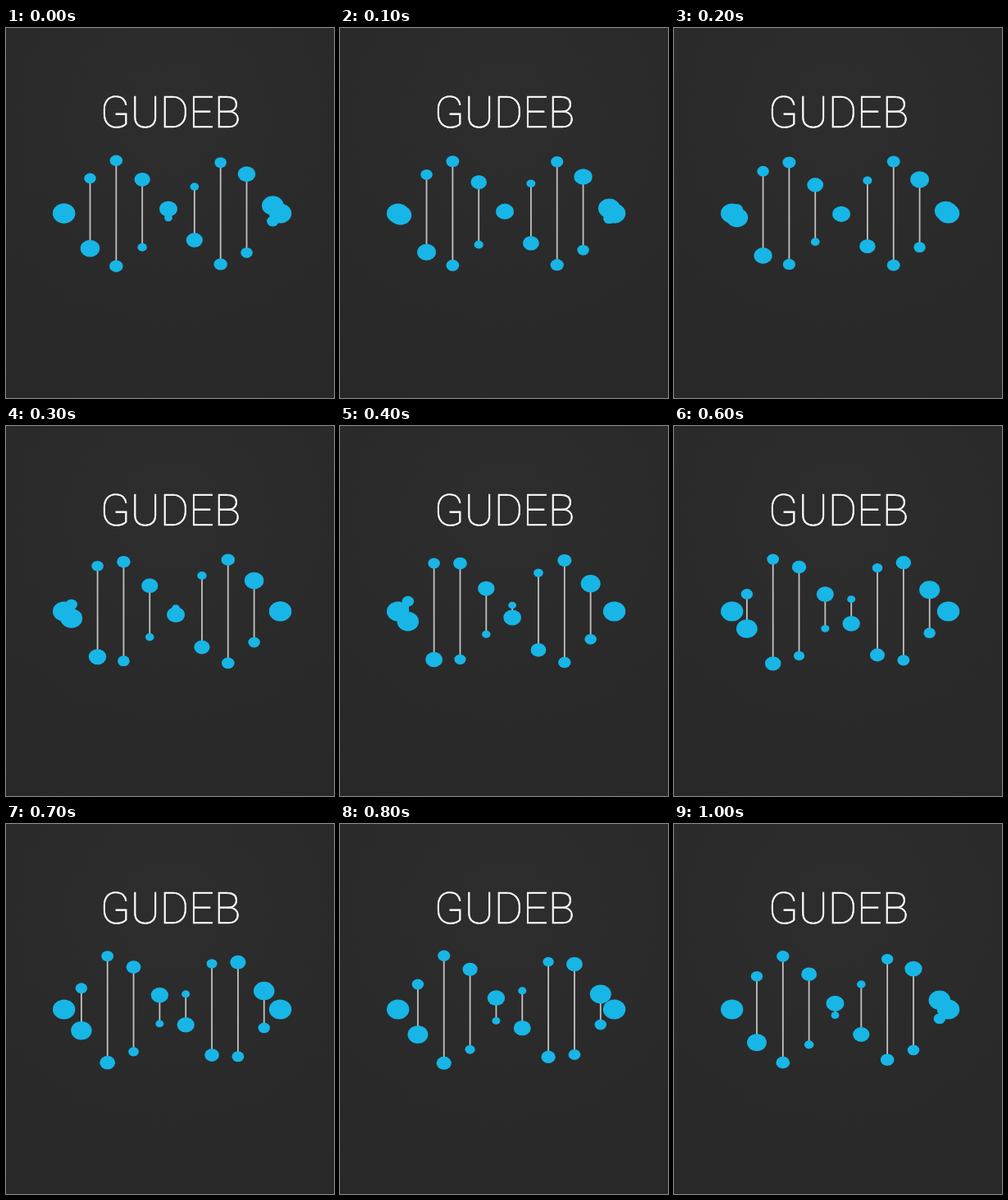
An HTML page with a canvas for the animation above (1.1 s loop, 400 by 450 pixels).

```html
<!DOCTYPE html>
<html lang="en">
<head>
<meta charset="utf-8">
<title>Helix</title>
<style>
html, body { margin: 0; width: 100%; height: 100%; overflow: hidden; background: #292929; }
canvas { display: block; }
</style>
</head>
<body>
<canvas id="stage" width="400" height="450"></canvas>
<script>
const ctx = document.getElementById('stage').getContext('2d');
const LOOP = 1100, STEP = 100;
const LEFT = 70.7, RIGHT = 334.5, MID = 225.5;
const GAP = 31.83, SHIFT = 3.03;
const BLUE = '#17b6e6', GREY = '#c2c2c2';

// Crossings and peaks of the strand: x, height above the axis, slope
const keys = [
  [LEFT, 0, 0.6], [127, 65.3, 0], [203.3, 0, -1.01], [268, -63, 0], [RIGHT, 0, 0.92]
];

// Cubic curve through the keys
function lift(x) {
  const i = Math.max(1, keys.findIndex(k => x <= k[0]));
  const [x0, y0, m0] = keys[i - 1], [x1, y1, m1] = keys[i];
  const w = x1 - x0, u = (x - x0) / w, v = 1 - u;
  return v * v * (1 + 2 * u) * y0 + u * u * (3 - 2 * u) * y1 +
    u * v * w * (v * m0 - u * m1);
}

// Dots swell as their strand turns towards the viewer.
function radius(x, base, swing) {
  const a = 2 * Math.PI * (x - LEFT) / (RIGHT - LEFT);
  return base + swing * Math.cos(a) + 0.6 * Math.cos(2 * a);
}

function dot(x, y, r) {
  ctx.beginPath();
  ctx.ellipse(x, y, r, r * 0.88, 0, 0, 2 * Math.PI);
  ctx.fill();
}

function rung(x) {
  const h = lift(x);
  ctx.beginPath();
  ctx.moveTo(x, MID - h);
  ctx.lineTo(x, MID + h);
  ctx.stroke();
  dot(x, MID - h, radius(x, 8.5, -1.8));
  dot(x, MID + h, radius(x, 8.6, 4.3));
}

function title(text) {
  ctx.font = '200 54px Roboto, "Open Sans", sans-serif';
  ctx.textAlign = 'center';
  ctx.fillStyle = ctx.strokeStyle = '#fff';
  ctx.lineWidth = 0.7;
  ctx.fillText(text, 200.5, 121.3);
  ctx.strokeText(text, 200.5, 121.3);
}

const glow = ctx.createRadialGradient(200, 110, 20, 200, 110, 380);
glow.addColorStop(0, '#2d2d2d');
glow.addColorStop(1, '#282828');

function draw(time) {
  const step = Math.floor(time % LOOP / STEP);
  ctx.fillStyle = glow;
  ctx.fillRect(0, 0, 400, 450);
  title('GUDEB');

  ctx.fillStyle = BLUE;
  ctx.strokeStyle = GREY;
  ctx.lineWidth = 1.8;
  for (let x = LEFT + step * SHIFT; x < RIGHT; x += GAP) rung(x);
  dot(LEFT, MID, 13.7);
  dot(RIGHT, MID, 13.7);
}

let start;
function tick(now) {
  start ??= now;
  draw(now - start);
  requestAnimationFrame(tick);
}
draw(0);
requestAnimationFrame(tick);
</script>
</body>
</html>
```
